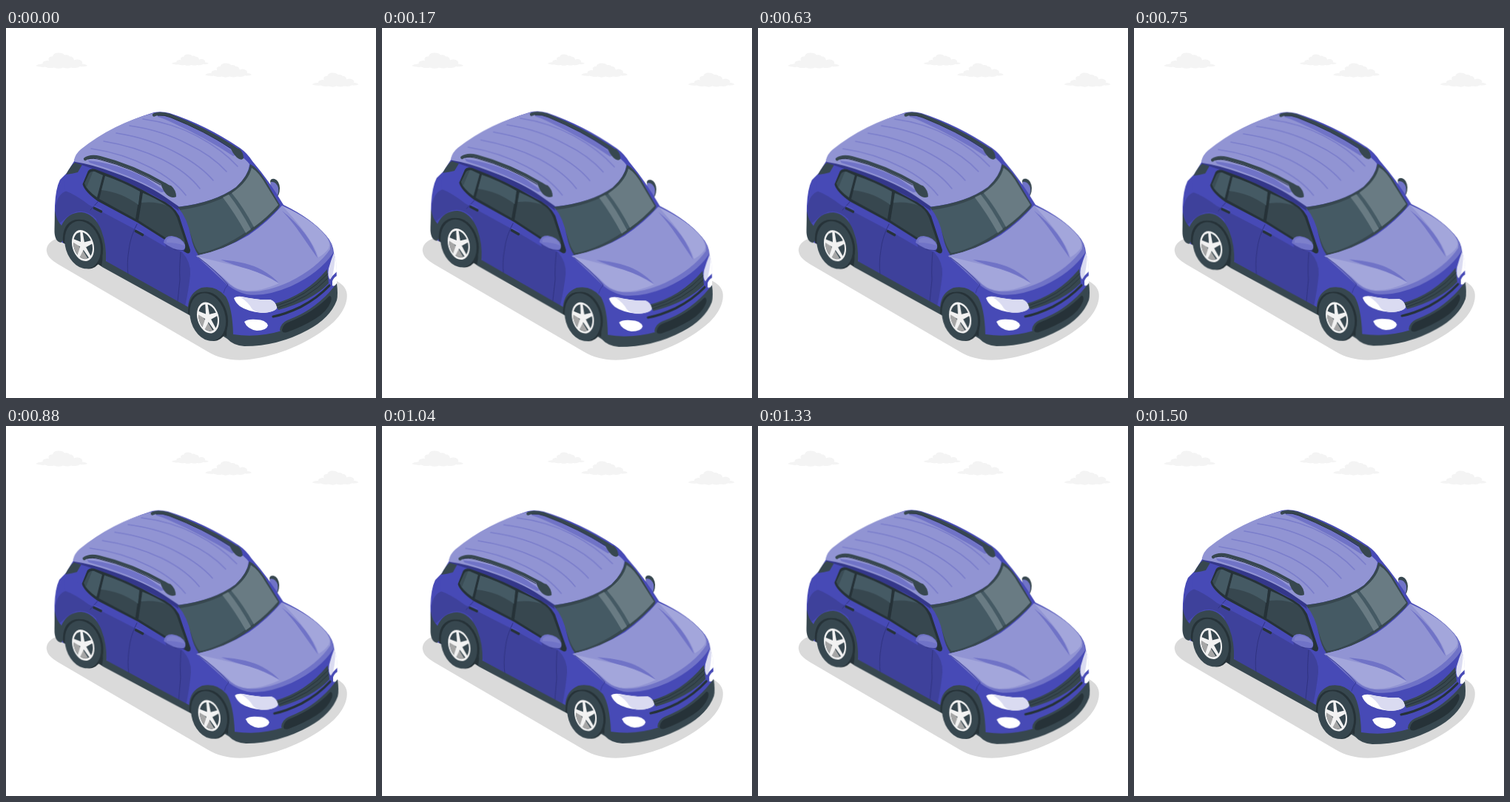
These frames come from a looping animation (500 px wide and 500 px high, 1.54 s). An HTML page:

```html
<!DOCTYPE html>
<html lang="en">
<head>
<meta charset="utf-8">
<title>Car</title>
<style>
  html, body { margin: 0; width: 100%; height: 100%; overflow: hidden; background: #fff; }
  svg { display: block; width: 100vw; height: 100vh; }
  .car { transform-origin: 257px 271px; animation: sway 1540ms ease infinite; }
  @keyframes sway {
    0%, 100% { transform: rotate(0deg); }
    25% { transform: rotate(1deg); }
    75% { transform: rotate(-1deg); }
  }
  .blue { fill: #474ab6; }
  .side { fill: #3e419b; }
  .deep { fill: #34378a; }
  .lilac { fill: #9194d3; }
  .pale { fill: #a3a6db; }
  .mid { fill: #7073c7; }
  .trim { fill: #37474f; }
  .black { fill: #263238; }
  .glass { fill: #455a64; }
  .glare { fill: #697b83; }
  .white { fill: #fff; }
  .tint { fill: #dadbf1; }
  .line { fill: none; stroke-linecap: round; stroke-linejoin: round; }
  .groove { stroke: #7b7ecb; stroke-width: 1.6; }
  .seam { stroke: #303381; stroke-width: 1; }
</style>
</head>
<body>
<svg viewBox="0 0 500 500">
  <defs>
    <path id="cloud" d="M0 17.500 Q4 14.500 9.500 15 Q9 11.500 13 11 Q16 10 18 11 Q16 6 21 5 L23 5 Q24 0 31 0 Q37 0 39 3 Q44 2 46 5 Q51 4.500 52 10 Q58 7.500 62 11 Q64 12.500 63 15 Q68 15 70 17.500 Q65 19.500 60 18.500 Q56 21.500 48 20 Q43 22 37 20 Q31 22.500 25 20 Q18 21.500 13 19 Q6 20 0 17.500 Z"/>
    <path id="spoke" d="M-3.600 -4 L-2.300 -19.500 L2.300 -19.500 L3.600 -4 Z"/>
    <g id="wheel">
      <ellipse class="black" cx="3" cy="-1" rx="23.500" ry="34" transform="rotate(-17)"/>
      <ellipse class="trim" cx="0" cy="-1" rx="23.500" ry="33" transform="rotate(-17)"/>
      <g transform="rotate(-16) scale(.67 1)">
        <circle r="21.500" fill="#f2f2f2"/>
        <circle r="18.500" fill="#37474f"/>
        <path d="M-14 -12 A18.500 18.500 0 0 0 2 18.400 L-3 6 L-8 0 Z" fill="#a6a6a6"/>
        <g fill="#f2f2f2">
          <circle r="5.500"/>
          <use href="#spoke" transform="rotate(14)"/>
          <use href="#spoke" transform="rotate(86)"/>
          <use href="#spoke" transform="rotate(158)"/>
          <use href="#spoke" transform="rotate(230)"/>
          <use href="#spoke" transform="rotate(302)"/>
        </g>
      </g>
    </g>
  </defs>

  <g fill="#f4f4f4">
    <use href="#cloud" transform="translate(40 33.500)"/>
    <use href="#cloud" transform="translate(223.500 35.500) scale(.72)"/>
    <use href="#cloud" transform="translate(269 47.500) scale(.9)"/>
    <use href="#cloud" transform="translate(413.500 60.500) scale(.9)"/>
  </g>
  <path fill="#dadada" d="M75 283 C59 286 54 295 55 302 C56 309 62 314 70 319 L272 437 C290 448 312 451 335 447 C375 441 415 422 442 398 C458 383 463 366 460 356 C457 347 450 343 440 339 L250 250 Z"/>

  <g class="car">
    <!-- far mirror -->
    <path class="trim" d="M357 207 Q358 203 363 204 Q369 206 370 216 Q370 227 364 230 L361 227 Z"/>
    <path class="mid" d="M358 208 Q365 207 368 216 Q369 226 364 230 L359 225 Q356 215 358 208 Z"/>

    <!-- body -->
    <path class="blue" d="M92 180 L100 168 Q140 132 200 114 Q210 112 221 115 Q270 131 316 162 Q326 169 333 180 Q356 207 375 239 Q414 258 433 281 Q442 291 443 304 Q447 318 447 345 L444 372 Q410 412 340 424 Q312 424 300 414 L248 380 L134 318 L72 288 Q65 282 66 240 Q67 217 73 205 L82 196 Z"/>
    <path class="side" d="M67 241 Q70 224 82 220 Q97 219 112 232 L122 236 L178 267 L218 293 L238 303 Q250 316 249 333 Q247 353 242 376 L136 316 L122 258 Q100 236 76 261 L66 268 Z"/>
    <path class="blue" d="M104 214 L112 228 L178 264 L214 285 L216 296 L178 274 L112 239 Q94 225 80 220 Q77 209 83 199 Z"/>
    <path class="trim" d="M81 198 Q88 185 94 181 L104 183 L97 195 Q90 197 81 198 Z"/>
    <path class="deep" d="M92 178 Q145 189 185 209 Q214 221 233 240 L235 248 Q213 232 181 217 Q140 197 105 186 L93 182 Z"/>

    <!-- side windows -->
    <path class="black" d="M103.500 211 L111 193 Q114 189 121 191 Q163 206 207 231 Q226 239 234 254 L249 300 Q249 306 244 304 L216 287 L178 263 L124 234 Q106 221 103.500 211 Z"/>
    <path class="glass" d="M106 210 L112 197 Q115 193 120 194 L131 199 L123 229 Q109 219 106 210 Z"/>
    <path class="black" d="M112 195 L118 193 L109 215 L106 210 Z" opacity=".3"/>
    <path class="trim" d="M134 200 Q158 208 181 221 L175 258 L126 231 Z"/>
    <path class="glass" d="M134 200 Q158 208 181 221 L179 239 Q156 222 129 219 Z"/>
    <path class="trim" d="M185 223 Q204 231 216 239 Q226 244 231 256 L242 289 L241 298 L215 283 L179 260 Z"/>
    <path class="glass" d="M185 223 Q204 231 217 240 Q203 234 183 236 Z"/>
    <path class="line" stroke="#263238" stroke-width="2.500" d="M183 222 L177 260"/>

    <!-- doors -->
    <path class="line seam" d="M124 235 L114 246 M177 265 Q168 282 166 300 Q163 318 165 333 M236 303 Q234 325 235 340 L232 369"/>
    <path class="line" stroke="#263238" stroke-width="3.600" d="M119.500 243.500 L128.500 248 M175.500 274.500 L184.500 279.500"/>
    <path class="line" stroke="#5659c2" stroke-width="1" d="M119 240.500 L129 245 M175 271.500 L185 276.500"/>

    <!-- cladding -->
    <path class="trim" d="M66 247 Q68 260 75 267 Q83 249 102 249 Q120 251 129 274 Q136 293 135 315 L246 377 Q247 358 264 351 Q284 347 297 363 Q306 378 307 414 Q340 419 373 409 L374 400 Q414 382 437 357 L447 345 Q449 360 447 368 Q438 392 408 408 Q368 430 322 430 Q307 429 299 420 L246 387 L130 323 L82 283 L74 290 Q65 288 65.500 272 Z"/>
    <path class="black" d="M77 290 Q75 264 94 259 Q114 256 126 280 Q133 305 129 322 Z"/>
    <path class="black" d="M246 386 Q246 361 263 357 Q283 355 293 375 Q300 395 298 417 Z"/>
    <use href="#wheel" x="104" y="294"/>
    <use href="#wheel" x="273" y="391.500"/>

    <!-- roof -->
    <path class="lilac" d="M92 178 Q94 170 101 164 Q145 129 199 115 Q211 113 222 119 Q270 140 313 170 Q324 177 329 184 Q328 199 311 215 Q282 236 234 241.500 Q226 236 213 227 Q188 210 145 195 Q115 184 94 181 Q91 180 92 178 Z"/>
    <path class="line groove" d="M185 123 Q224 128 258 146 Q292 164 313 187 M167 132 Q210 138 246 157 Q278 172 298 194 M149 142 Q195 149 233 170 Q264 187 280 206 M132 153 Q175 160 212 178 Q245 195 262 217 M115 163 Q157 169 194 188 Q226 204 243 226"/>
    <path class="mid" d="M205 117 Q216 116 228 121 Q275 142 312 171 L307 173 Q269 148 225 128 Q210 121 205 120 Z"/>
    <path class="line" stroke="#37474f" stroke-width="4.200" d="M200 117.500 Q207 114 221 118 Q270 137 307 161 Q316 166 318.500 175"/>
    <path class="trim" d="M303 161 Q306 169 312 175 Q318 180 321 176 Q321 168 315 163 Z"/>
    <path class="line" stroke="#263238" stroke-width="1" d="M205 118 Q214 117 223 121 Q270 140 303 162"/>
    <path class="mid" d="M111 179 Q150 183 190 203 L216 221 L210 222 Q165 197 113 182 Z"/>
    <path class="line" stroke="#37474f" stroke-width="4.200" d="M107 177 Q114 172 127 175 Q171 186 214 211 Q224 216 227 225"/>
    <path class="trim" d="M209 210 Q212 220 217 225 Q224 231 230 228 Q230 219 223 213 Z"/>
    <path class="line" stroke="#263238" stroke-width="1" d="M111 177 Q117 175 128 178 Q171 189 209 212"/>

    <!-- windscreen -->
    <path class="trim" d="M232 242 Q282 236 311 215 Q327 200 330 184 Q339 188 350 205 L370 239 Q370 243 364 248 Q331 281 292 298 Q271 306 259 307 Q252 299 247 282 Q242 259 232 242 Z"/>
    <path class="glass" d="M235 246 Q283 239 312 219 Q328 204 332 189 Q342 195 352 213 L368 239 Q328 279 288 296 Q271 303 261 304 Q255 297 250 280 Q243 260 235 246 Z"/>
    <path class="glare" d="M293 229 L301 225 Q316 244 331 272 L324 277 Q309 250 293 229 Z"/>
    <path class="glare" d="M305 223 Q328 207 332 189 Q342 195 352 213 L368 239 Q353 256 335 269 Q320 241 305 223 Z"/>
    <path class="blue" d="M233 243 Q245 257 250 282 Q253 297 260 307 L252 305 Q244 273 234 251 Z"/>

    <!-- bonnet -->
    <path class="mid" d="M257 308 Q295 300 328 280 Q354 262 373 240 Q413 258 432 280 Q442 291 442 304 Q424 331 385 349 Q350 364 325 360 Q312 357 299 347 Z"/>
    <path class="lilac" d="M257 308 Q295 300 328 280 Q354 262 373 240 Q413 258 431 279 Q440 290 438 299 Q421 324 383 343 Q350 358 325 356 Q313 355 303 347 Q284 328 257 308 Z"/>
    <path class="pale" d="M259 309 Q296 318 326 325 Q353 333 369 345 Q345 356 325 355 Q313 354 303 346 Q284 327 259 309 Z"/>
    <path class="mid" d="M290 313 Q327 316 346 327 Q360 335 369 345 Q350 333 328 326 Q306 320 290 313 Z"/>
    <path class="pale" d="M374 241 Q412 258 430 279 Q440 290 436 298 Q430 306 422 310 Q415 285 374 241 Z"/>
    <path class="mid" d="M373 247 Q391 261 404 278 Q416 294 421 311 Q409 294 398 278 Q388 263 373 247 Z"/>
    <path class="line" stroke="#383b96" stroke-width="1" d="M260 310 Q283 327 300 347 Q295 352 294 358"/>

    <!-- near mirror -->
    <path class="deep" d="M214 288 L228 300 L241 301 L242 296 Z"/>
    <path class="mid" d="M213 290 Q214 281 224 281 Q238 283 242 293 Q243 299 239 300 Q227 301 213 290 Z"/>
    <path class="lilac" d="M217 286 Q222 281 230 284 Q239 287 241 294 Q231 290 217 290 Z" opacity=".4"/>

    <!-- grille -->
    <path class="trim" d="M361 373 Q404 362 434 326 L436 345 Q413 369 368 381 Q366 376 361 373 Z"/>
    <path class="line" stroke="#263238" stroke-width="1" d="M366 375 Q406 363 435 332 M368 378 Q410 365 435 338"/>
    <path class="line" stroke="#263238" stroke-width="3.200" d="M361 390 Q377 387 398 377 Q421 365 437 348"/>
    <path class="trim" d="M370 408 Q371 399 380 395 Q416 381 439 358 L446 352 L446 368 Q428 396 374 416 Z"/>
    <path class="black" d="M373 408 Q374 400 383 397 Q416 384 437 362 Q441 362 439 370 Q434 383 418 393 Q400 404 380 411 Q373 413 373 408 Z"/>

    <!-- lamps -->
    <path class="white" d="M308 365 Q311 362 319 363 Q340 368 357 367 Q365 370 366 378 Q364 384 346 385 Q326 383 316 376 Q310 371 308 365 Z"/>
    <path class="tint" d="M316 363 Q340 368 357 367 Q365 370 366 378 Q364 384 346 385 Q336 384 332 379 Q328 371 316 363 Z"/>
    <path class="white" d="M322 397 Q327 393 338 394 Q351 394 354 402 Q352 409 339 409 Q326 407 322 397 Z"/>
    <path class="tint" d="M443 304 Q447 314 447 329 Q442 333 438 340 Q434 336 436 325 Q439 314 443 304 Z"/>
    <path class="white" d="M444.500 309 Q447 318 447 329 L441 335 Q444 324 444.500 309 Z"/>
    <path class="white" d="M441 342 Q443 337 447 335 L447 345 Q444 350 441 348 Z"/>
  </g>
</svg>
</body>
</html>
```
